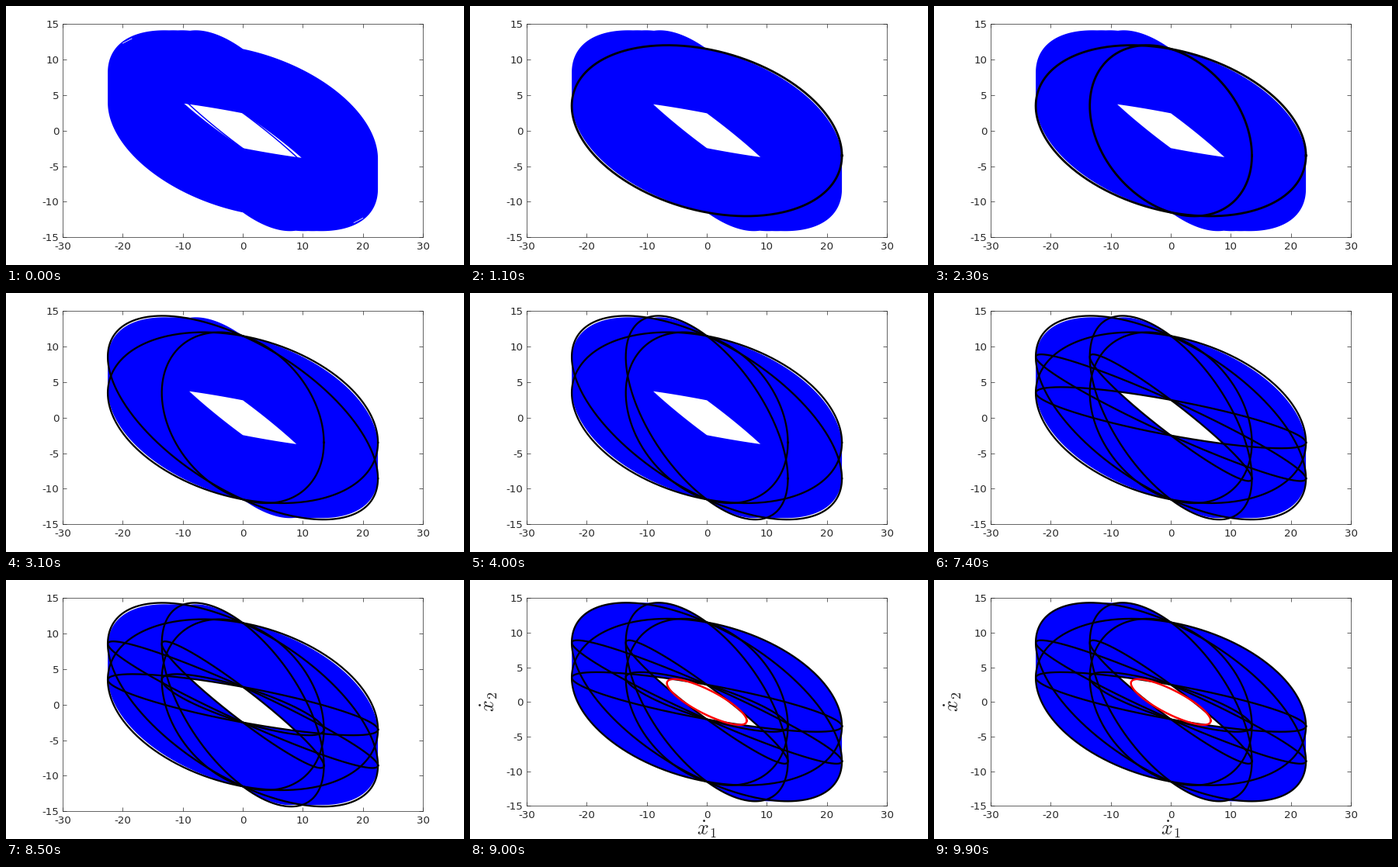
A matplotlib script for the animation above (10 s loop, 590x334 px).

```python
import numpy as np
import matplotlib.pyplot as plt
from matplotlib.animation import FuncAnimation

W, H, DPI = 590, 334, 100
PX = 72 / DPI  # points per pixel
LEFT, TOP = 73.1, 23.3
INK = "#262626"
BLUE = "#0000ff"

plt.rcParams["font.family"] = "DejaVu Sans"
plt.rcParams["mathtext.fontset"] = "cm"

# Ellipses x = a cos t, y = -c cos t + s sin t, in order of appearance
A_MIN, A_MAX = 13.5, 22.5
C_MIN, C_MAX = 3.5, 8.55
S_MIN, S_MAX = 2.5, 11.5
CORNERS = [(a, c, s)
           for s, c in ((S_MAX, C_MIN), (S_MAX, C_MAX), (S_MIN, C_MAX), (S_MIN, C_MIN))
           for a in (A_MAX, A_MIN)]
EVENTS = [600, 1800, 3000, 3600, 4800, 6000, 6600, 7800, 9000]  # ms
STEP = 100


def ellipse(a, c, s):
    t = np.linspace(0, 2 * np.pi, 361)
    return a * np.cos(t), -c * np.cos(t) + s * np.sin(t)


def arc(x, a, c, s):
    u = np.clip(x / a, -1, 1)
    return -c * u + s * np.sqrt(1 - u * u)


def mirrored(x, y):
    """Close an upper curve with its point reflection."""
    return np.column_stack([np.r_[x, -x], np.r_[y, -y]])


def outer(c_low, c_high):
    x = A_MAX * np.sin(np.linspace(-np.pi / 2, np.pi / 2, 401))
    tops = [np.where(np.abs(x) <= a, arc(x, a, c_high, S_MAX), -99)
            for a in (A_MIN, 17.5, 20, A_MAX)]
    y = np.where(x < 0, np.max(tops, axis=0), arc(x, A_MAX, c_low, S_MAX))
    return mirrored(x, y)


def hole(c_high, c_low=3.7, s=2.45):
    x = np.linspace(0, A_MIN, 2000)
    low = -arc(-x, A_MAX, c_low, s)
    high = arc(x, A_MIN, c_high, s)
    tip = x[np.argmax(high < low)]
    x = np.linspace(-tip, tip, 201)
    y = np.where(x < 0, arc(x, A_MAX, c_low, s), arc(x, A_MIN, c_high, s))
    return mirrored(x, y)


fig = plt.figure(figsize=(W / DPI, H / DPI), dpi=DPI, facecolor="white")
ax = fig.add_axes([0, 0, 1, 1])
ax.set(xlim=(-30, 30), ylim=(-15, 15))
xt, yt = range(-30, 31, 10), range(-15, 16, 5)
ax.set_xticks(xt, [str(v) for v in xt])
ax.set_yticks(yt, [str(v) for v in yt])
ax.tick_params(direction="in", top=True, right=True, length=4.6 * PX, width=0.7 * PX,
               color=INK, labelcolor=INK, labelsize=13.4 * PX)
ax.tick_params(axis="x", pad=5.5 * PX)
ax.tick_params(axis="y", pad=4.8 * PX)
for spine in ax.spines.values():
    spine.set(color=INK, linewidth=0.7 * PX)


def line(x, y, color, width, z):
    return ax.plot(x, y, color=color, lw=width * PX, zorder=z)[0]


body = ax.fill([0], [0], color=BLUE, lw=0, zorder=1)[0]
gap = ax.fill([0], [0], color="white", lw=0, zorder=1.2)[0]
thread = line(*ellipse(A_MIN, 8.4, S_MIN), BLUE, 1.5, 1.3)
slits = [line([k * -20, k * -18.5], [k * 12.3, k * 12.95], "white", 0.8, 1.4)
         for k in (1, -1)]
rings = [line(*ellipse(*p), "black", 2.3, 2.2) for p in CORNERS]
red = line(*ellipse(6.65, 2.7, 1.9), "red", 2.5, 2.4)
labels = [fig.text(305 / W, 1 - 322 / H, r"$\dot{x}_1$", ha="center", va="center"),
          fig.text(24.5 / W, 1 - 157 / H, r"$\dot{x}_2$", ha="center", va="center",
                   rotation=90)]
for text in labels:
    text.set(color=INK, fontsize=26 * PX)

BODY, BODY_FULL = outer(3.95, 8.2), outer(C_MIN, C_MAX)
GAP_WIDE, GAP = hole(7.6), hole(8.4)


def update(i):
    stage = sum(i * STEP >= e for e in EVENTS)
    last = stage == len(EVENTS)
    height = 268 if last else 275
    ax.set_position([LEFT / W, 1 - (TOP + height) / H, 464 / W, height / H])
    body.set_xy(BODY_FULL if last else BODY)
    gap.set_xy(GAP if stage else GAP_WIDE)
    for item in [thread, *slits]:
        item.set_visible(stage == 0)
    for k, ring in enumerate(rings):
        ring.set_visible(k < stage)
        ring.set_linewidth((2.8 if stage < 3 else 2.3) * PX)
    for item in [red, *labels]:
        item.set_visible(last)
    return [body, gap, thread, red, *slits, *rings, *labels]


anim = FuncAnimation(fig, update, frames=100, interval=STEP, repeat=True,
                     repeat_delay=0, blit=False)
plt.show()
```
